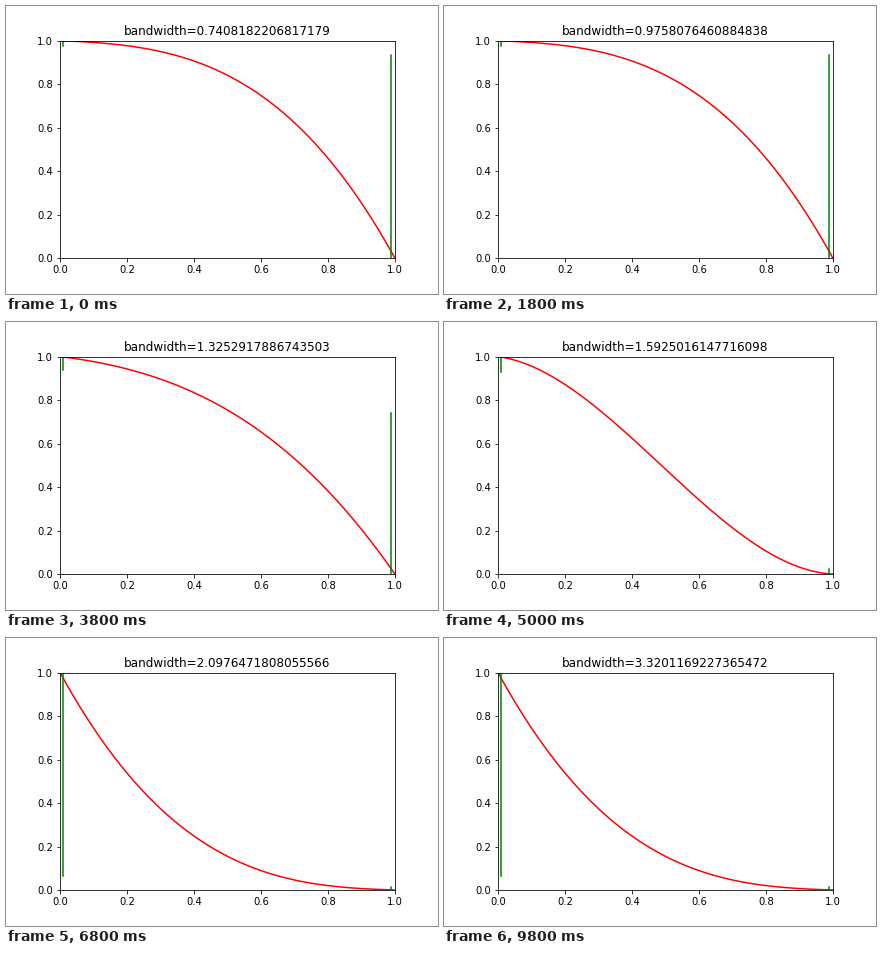
Animation, 432 px wide and 288 px high, one loop 10000 ms. Source, as a matplotlib script:

```python
import numpy as np
import matplotlib.pyplot as plt
from matplotlib.animation import FuncAnimation

FRAMES = 50
INTERVAL = 200
POWER = 2.52

bandwidths = np.exp(np.linspace(-0.3, 1.2, FRAMES))
t = np.linspace(0, 1, 201)


def ramp(i, start, end):
    return min(max((i - start) / (end - start), 0), 1)


def handles(i):
    """Inner control heights: the right one drops first, then the left one."""
    p = ramp(i, 12, 25)
    q = ramp(i, 25, 33)
    q = q * q * (3 - 2 * q)
    a = 0.976 - 0.045 * (1 - (1 - p)**POWER) - 0.867 * q
    b = 0.932 - 0.910 * p**POWER - 0.006 * q
    return a, b


def bezier(a, b):
    """Cubic from (0, 1) to (1, 0) with inner control heights a and b."""
    s = 1 - t
    return s**3 + 3 * s**2 * t * a + 3 * s * t**2 * b


fig = plt.figure(figsize=(6, 4), dpi=72, facecolor="white")
ax = fig.add_axes([0.125, 0.125, 0.775, 0.755])
ax.set_xlim(0, 1)
ax.set_ylim(0, 1)
title = ax.set_title("")
curve, = ax.plot([], [], color="red", lw=1.5)
left, = ax.plot([], [], color="green", lw=1.5)
right, = ax.plot([], [], color="green", lw=1.5)


def draw(i):
    a, b = handles(i)
    curve.set_data(t, bezier(a, b))
    left.set_data([0.01, 0.01], [1, a])
    right.set_data([0.99, 0.99], [0, b])
    title.set_text(f"bandwidth={float(bandwidths[i])}")
    return curve, left, right, title


anim = FuncAnimation(fig, draw, frames=FRAMES, interval=INTERVAL,
                     init_func=lambda: draw(0), repeat=True, repeat_delay=0)
plt.show()
```
